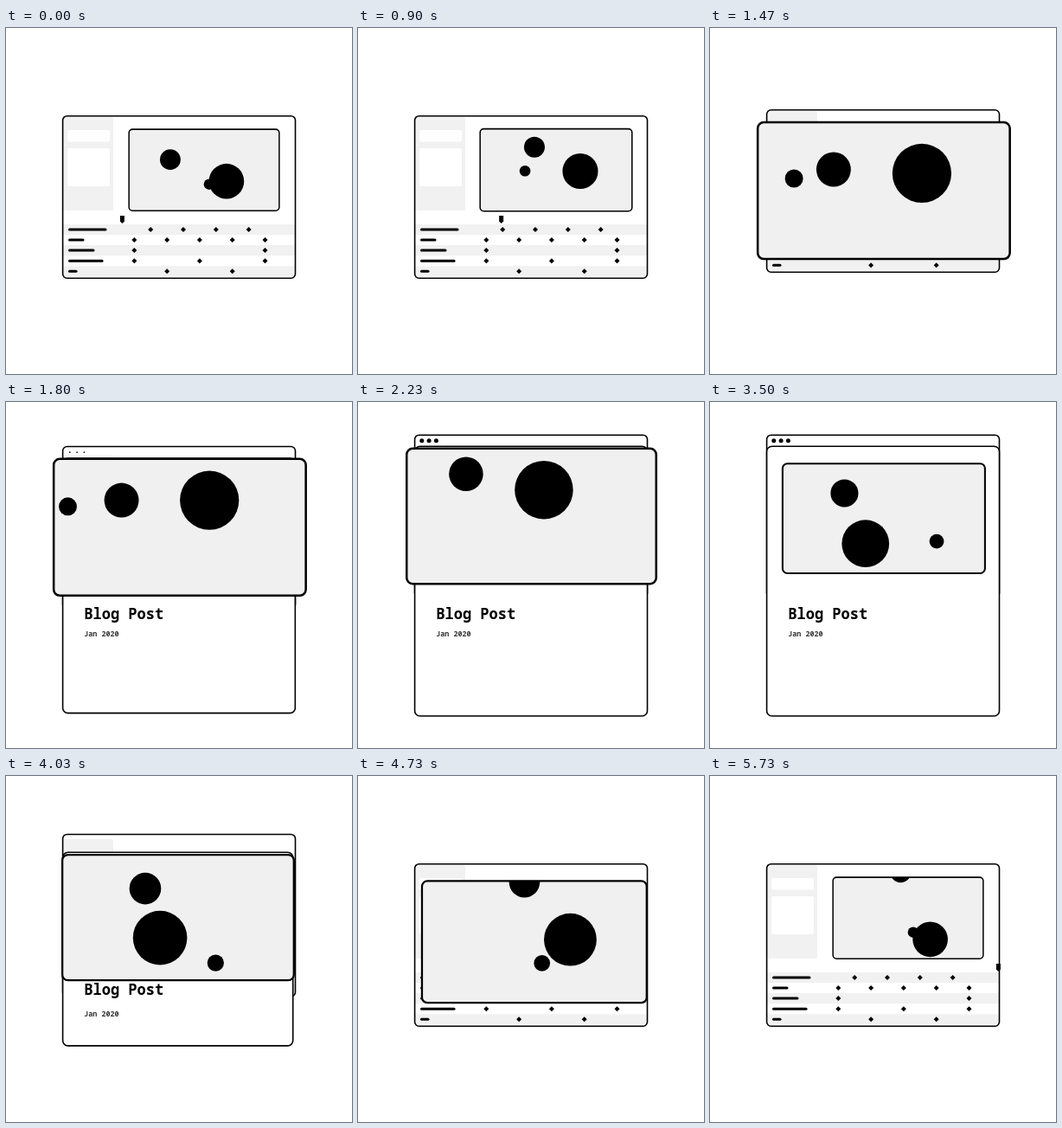
Recreate the animation shown at these times as an HTML page with a canvas. Size 400 by 400 pixels, loop 5760 ms.

```html
<!DOCTYPE html>
<html>
<head>
<meta charset="utf-8">
<style>
html, body { margin: 0; width: 100%; height: 100%; overflow: hidden; background: #fff; }
canvas { display: block; width: 400px; height: 400px; }
</style>
</head>
<body>
<canvas width="400" height="400"></canvas>
<script>
const LOOP = 5760, LEFT = 65.6, WIDTH = 268.9;
const g = document.querySelector('canvas').getContext('2d');

const cubic = u => u < .5 ? 4 * u ** 3 : 1 - 4 * (1 - u) ** 3;
const sine = u => (1 - Math.cos(Math.PI * u)) / 2;
const clamp = u => Math.max(0, Math.min(1, u));
const step = (t, from, to, ease = cubic) => ease(clamp((t - from) / (to - from)));

// Key poses: time, then x, y of the three balls as fractions of the panel
const poses = [
  [0, .45, -.064, .647, .77, .534, .675],
  [1470, .301, .345, .651, .373, .144, .411],
  [2230, .238, .188, .55, .306, -.06, .3],
  [2770, .248, .209, .461, .716, -.212, .417],
  [4030, .358, .269, .422, .662, -.458, .862],
  [4730, .456, .01, .66, .482, -.586, .675],
  [LOOP, .45, -.064, .647, .77, -.586, .675]
];
// The loop opens with a brief hard cut
const opening = [0, .275, .372, .649, .638, .534, .675];

// Smooth path through the key poses
function poseAt(t) {
  if (t < 30) return opening;
  const i = poses.findIndex(p => p[0] > t) - 1;
  const a = poses[i], b = poses[i + 1];
  const before = poses[i - 1] || a, after = poses[i + 2] || b;
  const d = b[0] - a[0], u = (t - a[0]) / d;
  return a.map((v, k) => {
    const ma = (b[k] - before[k]) / (b[0] - before[0]);
    const mb = (after[k] - a[k]) / (after[0] - a[0]);
    return v + (b[k] - v) * u * u * (3 - 2 * u) + d * u * (1 - u) * (ma * (1 - u) - mb * u);
  });
}

function box(x, y, w, h, r, fill, line) {
  g.beginPath();
  g.roundRect(x, y, w, h, r);
  g.fillStyle = fill;
  g.fill();
  if (line) {
    g.lineWidth = line;
    g.stroke();
  }
}

function dot(x, y, r) {
  g.beginPath();
  g.arc(x, y, r, 0, 7);
  g.fillStyle = '#000';
  g.fill();
}

function poly(...p) {
  g.beginPath();
  for (let i = 0; i < p.length; i += 2) g.lineTo(p[i], p[i + 1]);
  g.fillStyle = '#000';
  g.fill();
}

// Timeline rows: bar length, then marker columns
const rows = [
  [44, .5, 1.5, 2.5, 3.5],
  [18, 0, 1, 2, 3, 4],
  [30, 0, 4],
  [40, 0, 2, 4],
  [10, 1, 3]
];

function editor(t, top, blog) {
  g.save();
  g.translate(0, top);
  box(LEFT, 0, WIDTH, 187.5, 5, '#fff');
  g.clip();
  const drop = 14 * blog * blog;
  box(LEFT, 1.4 + drop, 58.4, 108, 2, '#f1f1f1');
  box(71, 16.4 + drop, 49, 13.5, 2, '#fff');
  box(71, 37.4 + drop, 49, 44, 2, '#fff');
  rows.forEach(([len, ...marks], i) => {
    const y = 131.2 + 12.1 * i;
    if (i % 2 == 0) box(LEFT, y - 6, WIDTH, 12.1, 0, '#f1f1f1');
    box(72, y - 1.5, len + .5, 3, 1.5, '#000');
    for (const m of marks) {
      const x = 148.3 + 37.8 * m;
      poly(x - 3, y, x, y - 3, x + 3, y, x, y + 3);
    }
  });
  g.restore();
  box(LEFT, top, WIDTH, 187.5, 5, 'transparent', 1.6);
  const x = 134.4 + 200 * t / LOOP, y = top + 115.2;
  poly(x - 2.5, y, x + 2.5, y, x + 2.5, y + 6.5, x, y + 9, x - 2.5, y + 6.5);
  const pop = clamp((blog - .7) / .25);
  for (let i = 0; i < 3; i++) dot(73.8 + 8.3 * i, top + 6.6, 2.5 * pop);
}

// tuck: 0 = full page, 1 = hidden behind the panel
function page(top, tuck) {
  if (tuck >= 1) return;
  const y = top + 13 + 17 * tuck;
  g.save();
  box(LEFT, y, WIDTH - 6 * tuck, 363 - 111 * tuck - y, 6, '#fff', 1.6);
  g.clip();
  g.fillStyle = '#000';
  g.font = 'bold 17px "Noto Sans Mono", monospace';
  g.fillText('Blog Post', 90.3, 250.6 + 5.5 * tuck);
  g.fillStyle = '#333';
  g.font = '600 8.4px "Noto Sans Mono", monospace';
  g.fillText('Jan 2020', 90.3, 270.8 + 15 * tuck);
  g.restore();
}

function panel(t, top) {
  const open = step(t, 816, 1342) - step(t, 4516, 5042);
  const centre = step(t, 870, 1370) - step(t, 4611, 5011);
  const inset = step(t, 2060, 2780) - step(t, 3602, 4374, sine);
  const arc = 8 * inset * (1 - inset);
  const w = 173.7 + 117.8 * open - 57.5 * inset, h = w * .542;
  const x = 229 - 28.1 * centre - arc - w / 2;
  const y = top + 62.5 + 30.8 * centre + 3.1 * inset + .8 * arc - h / 2;
  const ball = (bx, by, r) => dot(x + bx * w, y + by * h, r * w);
  const [, mx, my, bx, by, sx, sy] = poseAt(t);
  g.save();
  box(x, y, w, h, w * .024, '#f0f0f0');
  g.clip();
  ball(mx, my, .0685);
  ball(bx, by, .117);
  // the small ball leaves on the left and returns on the right
  ball(sx, sy, .036);
  ball(sx + 1.12, sy, .036);
  g.restore();
  box(x, y, w, h, w * .024, 'transparent', w / 115);
}

function draw(now) {
  const t = now % LOOP, back = step(t, 3612, 4492, sine);
  const blog = step(t, 1163, 2181) - back;
  const top = 101.7 - 63.5 * blog;
  g.clearRect(0, 0, 400, 400);
  g.strokeStyle = '#000';
  editor(t, top, blog);
  page(top, 1 - step(t, 1252, 1934) + back);
  panel(t, top);
}

let start;
function tick(now) {
  start ??= now;
  draw(now - start);
  requestAnimationFrame(tick);
}
draw(0);
requestAnimationFrame(tick);
</script>
</body>
</html>
```
